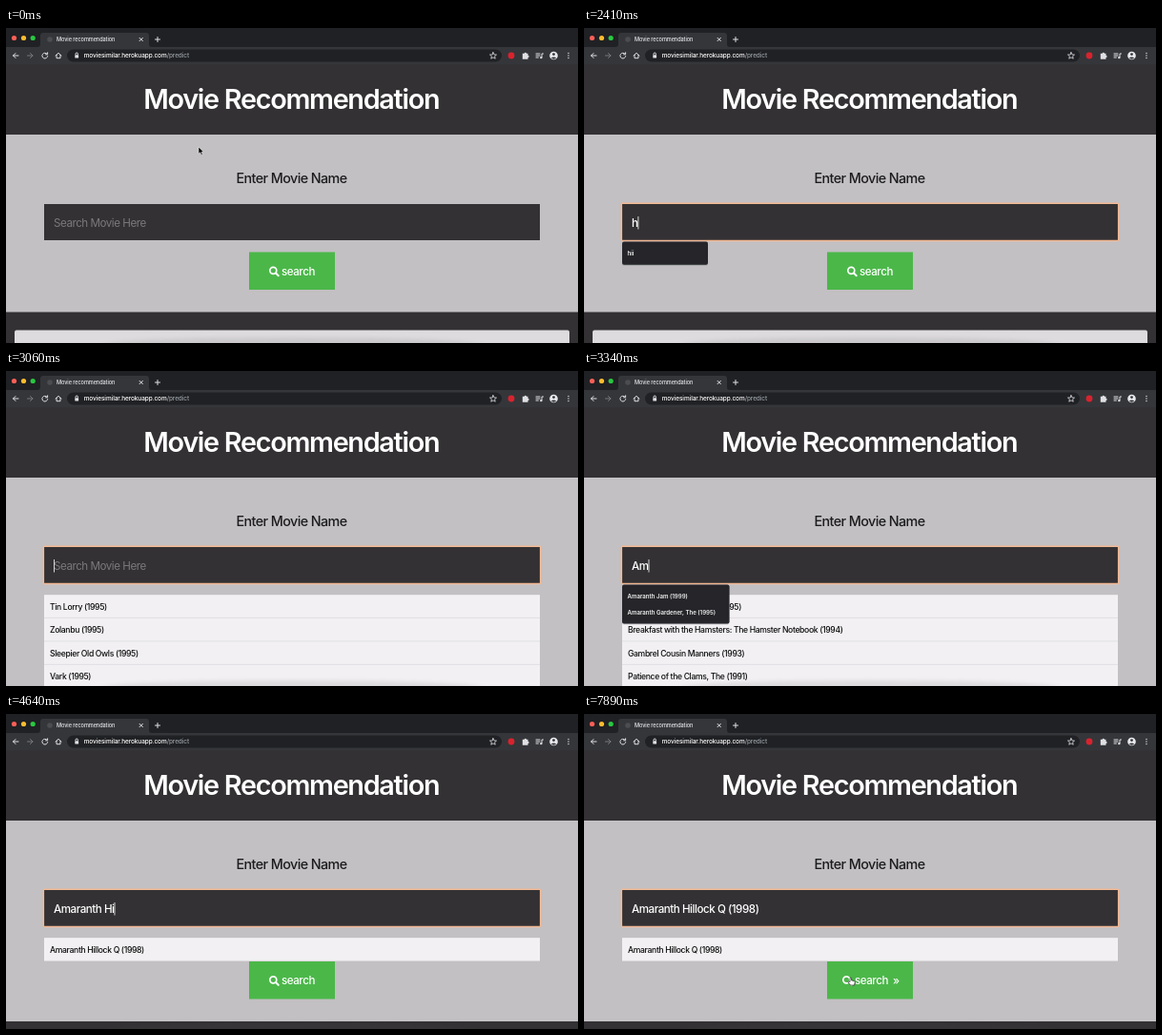
Write an HTML page that moves like this. It is 600 px wide and 331 px high and loops after 7990 ms.

```html
<!DOCTYPE html>
<html lang="en">
<head>
<meta charset="utf-8">
<title>Movie recommendation</title>
<style>
  html, body { margin: 0; width: 100%; height: 100%; overflow: hidden; background: #c2c0c2; }
  svg { display: block; width: 100vw; height: 100vh; }
  text { font-family: Inter, Roboto, sans-serif; font-weight: 500; letter-spacing: -.04em; white-space: pre; }
  .line { fill: none; stroke: #dfe0e3; stroke-width: 1; stroke-linecap: round; stroke-linejoin: round; }
  .field { font-size: 11.6px; }
  .row { font-size: 8.6px; fill: #0c0c0c; }
  .hint { font-size: 6.1px; font-weight: 600; fill: #f2f3f3; letter-spacing: 0; }
  .bar { font-size: 6.5px; letter-spacing: -.015em; }
</style>
</head>
<body>
<svg viewBox="0 0 600 331" preserveAspectRatio="none">
  <defs>
    <filter id="soft" x="-10%" y="-200%" width="120%" height="500%"><feGaussianBlur stdDeviation="4 2"/></filter>
    <filter id="drop" x="-10%" y="-20%" width="120%" height="150%"><feDropShadow dx="0" dy=".5" stdDeviation=".7" flood-opacity=".3"/></filter>
  </defs>

  <rect width="600" height="331" fill="#c2c0c2"/>
  <rect y="38" width="600" height="74" fill="#333133"/>
  <text x="299.3" y="85" text-anchor="middle" fill="#fff" font-size="28.8" style="font-weight:600;letter-spacing:-.045em">Movie Recommendation</text>
  <text x="299.5" y="162.5" text-anchor="middle" fill="#1c1b1d" font-size="14.3">Enter Movie Name</text>

  <g id="below">
    <rect y="298.5" width="600" height="140" fill="#333133"/>
    <rect x="9" y="317.5" width="582" height="120" rx="2" fill="#dddbde"/>
    <g id="button">
      <rect x="255" y="235.5" width="90" height="39.5" fill="#4bb749"/>
      <g id="label" fill="#fff">
        <circle cx="280.3" cy="254.8" r="3.5" fill="none" stroke="#fff" stroke-width="1.7"/>
        <path d="M283 257.5l2.7 2.7" stroke="#fff" stroke-width="2" stroke-linecap="round"/>
        <text class="field" x="289" y="259.5">search</text>
      </g>
      <text id="quote" class="field" x="330.5" y="259.5" text-anchor="end" fill="#fff">»</text>
    </g>
  </g>

  <g id="list"></g>
  <ellipse cx="300" cy="333" rx="198" ry="8" fill="#555" opacity=".13" filter="url(#soft)"/>

  <rect x="40" y="185" width="520" height="38" fill="#333133"/>
  <rect id="ring" x="39.3" y="184.3" width="521.4" height="39.2" rx="1" fill="none" stroke="#f2b893" stroke-width="1.6"/>
  <text id="placeholder" class="field" x="50" y="209" fill="#7b797c" style="font-weight:400">Search Movie Here</text>
  <text id="typed" class="field" x="50" y="209" fill="#fff"></text>
  <rect id="caret" y="198" width=".8" height="13.5" fill="#fff"/>
  <g id="popup"></g>

  <!-- browser bar -->
  <rect width="600" height="20" fill="#202124"/>
  <path d="M33 20q3 0 3-3V8q0-3 3-3h108q3 0 3 3v9q0 3 3 3z" fill="#35363a"/>
  <rect y="20" width="600" height="18" fill="#35363a"/>
  <rect x="64" y="22.5" width="456" height="13" rx="6.5" fill="#202124"/>
  <circle cx="8.5" cy="10.5" r="2.6" fill="#ff5f57"/>
  <circle cx="18.5" cy="10.5" r="2.6" fill="#febc2e"/>
  <circle cx="28.2" cy="10.5" r="2.6" fill="#28c840"/>
  <circle cx="46" cy="12" r="2.8" fill="#4c4d51"/>
  <text class="bar" x="53" y="14.2" fill="#e8eaed" style="font-size:5.6px">Movie recommendation</text>
  <path class="line" stroke-width=".8" d="M140 10.3l3.4 3.4m0-3.4l-3.4 3.4M156.5 12h5m-2.5-2.5v5"/>
  <path class="line" d="M13 29H7.5m2.5-2.5L7.5 29l2.5 2.5"/>
  <path class="line" style="stroke:#77787c" d="M22.5 29H28m-2.5-2.5L28 29l-2.5 2.5"/>
  <path class="line" d="M43 27.2a2.9 2.9 0 1 0 .7 2.4M43.6 25.8v2h-2"/>
  <path class="line" d="M52 29l3-2.7 3 2.7M53 28.5v3.2h4v-3.2"/>
  <rect x="72.3" y="28.3" width="3.8" height="3.2" rx=".5" fill="#dfe0e3"/>
  <path class="line" stroke-width=".7" d="M73 28v-.8a1.2 1.2 0 0 1 2.4 0v.8"/>
  <text class="bar" x="81.7" y="31.2" fill="#fff">moviesimilar.herokuapp.com<tspan fill="#9aa0a6">/predict</tspan></text>
  <path class="line" style="stroke-width:.8" d="M511 25.6l1 2.3 2.5.2-1.9 1.6.6 2.5-2.2-1.3-2.2 1.3.6-2.5-1.9-1.6 2.5-.2z"/>
  <circle cx="530" cy="29" r="3.4" fill="#d9232e"/>
  <path d="M541.8 26.8h1.9a1.1 1.1 0 0 1 2.2 0h1.6v2a1.1 1.1 0 0 1 0 2.2v1.7h-5.7z" fill="#dfe0e3"/>
  <path class="line" d="M556 27h4m-4 2h4m-4 2h2.4m3.6.2V27h1.5"/>
  <circle cx="561.2" cy="31.2" r="1.1" fill="#dfe0e3"/>
  <circle cx="574.5" cy="29" r="4.3" fill="#e8eaed"/>
  <circle cx="574.5" cy="27.6" r="1.4" fill="#35363a"/>
  <path d="M571.8 31.6q2.7-2.4 5.4 0-2.7 2.3-5.4 0z" fill="#35363a"/>
  <path d="M590 26.5v0m0 2.5v0m0 2.5v0" stroke="#dfe0e3" stroke-width="1.4" stroke-linecap="round"/>

  <g id="pointer">
    <path id="arrow" d="M0 0v7.3l1.7-1.6 1.2 2.7 1.3-.6-1.2-2.6h2.3z" fill="#000" stroke="#fff" stroke-width=".5"/>
    <path id="beam" d="M-1.5-5Q0-5 0-4V4Q0 5-1.5 5M1.5-5Q0-5 0-4V4Q0 5 1.5 5" fill="none" stroke="#f4f4f4" stroke-width=".8"/>
    <path id="hand" d="M-1-3.5q1-1 1.6 0v2.4l3 .7q.8.3.6 1.3L3.6 4H-.4L-3 .8q0-1.2 1.2-.8l.8.6z" fill="#fff" stroke="#222" stroke-width=".7"/>
  </g>
</svg>
<script>
const LOOP = 7990, ROW = 24.5, LIST_TOP = 235.2, LIST_START = 2600;
const $ = id => document.getElementById(id);
const show = (id, on) => $(id).setAttribute('visibility', on ? 'visible' : 'hidden');
const clamp = v => Math.max(0, Math.min(1, v));

const movies = [
  'Tin Lorry (1995)', 'Zolanbu (1995)', 'Sleepier Old Owls (1995)', 'Vark (1995)',
  'Amaranth Gardener, The (1995)',
  'Breakfast with the Hamsters: The Hamster Notebook (1994)',
  'Gambrel Cousin Manners (1993)', 'Patience of the Clams, The (1991)',
  'Amaranth Wharf Lullaby (1990)', 'Amaranth Hillock Q (1998)', 'Amaranth Jam (1999)'
];
const history = ['hii', 'Amaranth Jam (1999)', 'Amaranth Gardener, The (1995)'];

// each key press: [time, field content]
const title = 'Amaranth Hillock Q (1998)';
const keyTimes = [
  3160, 3250, 3440, 3530, 3710, 3900, 4000, 4100, 4280, 4370, 4560, 4830, 5200,
  5390, 5570, 5760, 5940, 6040, 6310, 6500, 6680, 6860, 7040, 7160, 7340
];
const keys = [[0, ''], [560, ''], [2300, 'h'], [2600, ''],
  ...keyTimes.map((time, i) => [time, title.slice(0, i + 1)])];

// pointer poses: [time, shape, x, y]
const poses = [
  [0, 'arrow', 202, 125], [90, 'arrow', 203, 150], [190, 'beam', 204, 190],
  [280, 'beam', 204, 205], [1100, 'beam', 190, 205], [1300, 'beam', 167, 205],
  [2300, '', 0, 0], [7520, 'beam', 167, 205], [7620, 'arrow', 236, 246],
  [7710, 'hand', 274, 277], [7790, 'hand', 280, 281]
];
const at = (table, t) => table.findLast(step => step[0] <= t);

function drawList(rows) {
  $('list').innerHTML = rows.slice(0, 4).map((name, i) => {
    const y = LIST_TOP + i * ROW;
    return `<rect x="40" y="${y}" width="520" height="${ROW}" fill="#f2f0f3"/>
      <path d="M40 ${y + ROW - .3}H560" stroke="#d4d2d5" stroke-width=".6"/>
      <text class="row" x="46" y="${y + 15.3}">${name}</text>`;
  }).join('');
  $('below').setAttribute('transform', `translate(0 ${rows.length * ROW})`);
}

function drawPopup(hints) {
  const width = hints[0] === 'hii' ? 90 : 112.5;
  $('popup').innerHTML = hints.length ? `<rect x="40" y="224.5" width="${width}"
    height="${7.5 + 16.8 * hints.length}" rx="2" fill="#25272a" filter="url(#drop)"/>` +
    hints.map((hint, i) => `<text class="hint" x="45.5" y="${238.7 + i * 16.8}">${hint}</text>`).join('') : '';
}

let lastState = '';
function render(t) {
  const [pressed, query] = at(keys, t);
  const listed = t >= LIST_START;
  const state = query + listed;
  if (state !== lastState) {
    lastState = state;
    const needle = query.toLowerCase();
    drawList(listed ? movies.filter(m => m.toLowerCase().includes(needle)) : []);
    drawPopup(query ? history.filter(h => h.startsWith(query)) : []);
    $('typed').textContent = query;
    $('caret').setAttribute('x', 50 + (query ? $('typed').getComputedTextLength() : 0));
    show('placeholder', !query);
  }
  $('ring').setAttribute('opacity', clamp((t - 560) / 150));
  show('caret', t >= 560 && (t - pressed) % 1000 < 500);

  const [, shape, x, y] = at(poses, t);
  for (const id of ['arrow', 'beam', 'hand']) show(id, id === shape);
  $('pointer').setAttribute('transform', `translate(${x} ${y})`);

  const hover = 1 - (1 - clamp((t - 7590) / 300)) ** 2;
  $('label').setAttribute('transform', `translate(${-5 * hover} 0)`);
  $('quote').setAttribute('opacity', hover);
}

const start = performance.now();
function tick() {
  render((performance.now() - start) % LOOP);
  requestAnimationFrame(tick);
}
tick();
</script>
</body>
</html>
```
